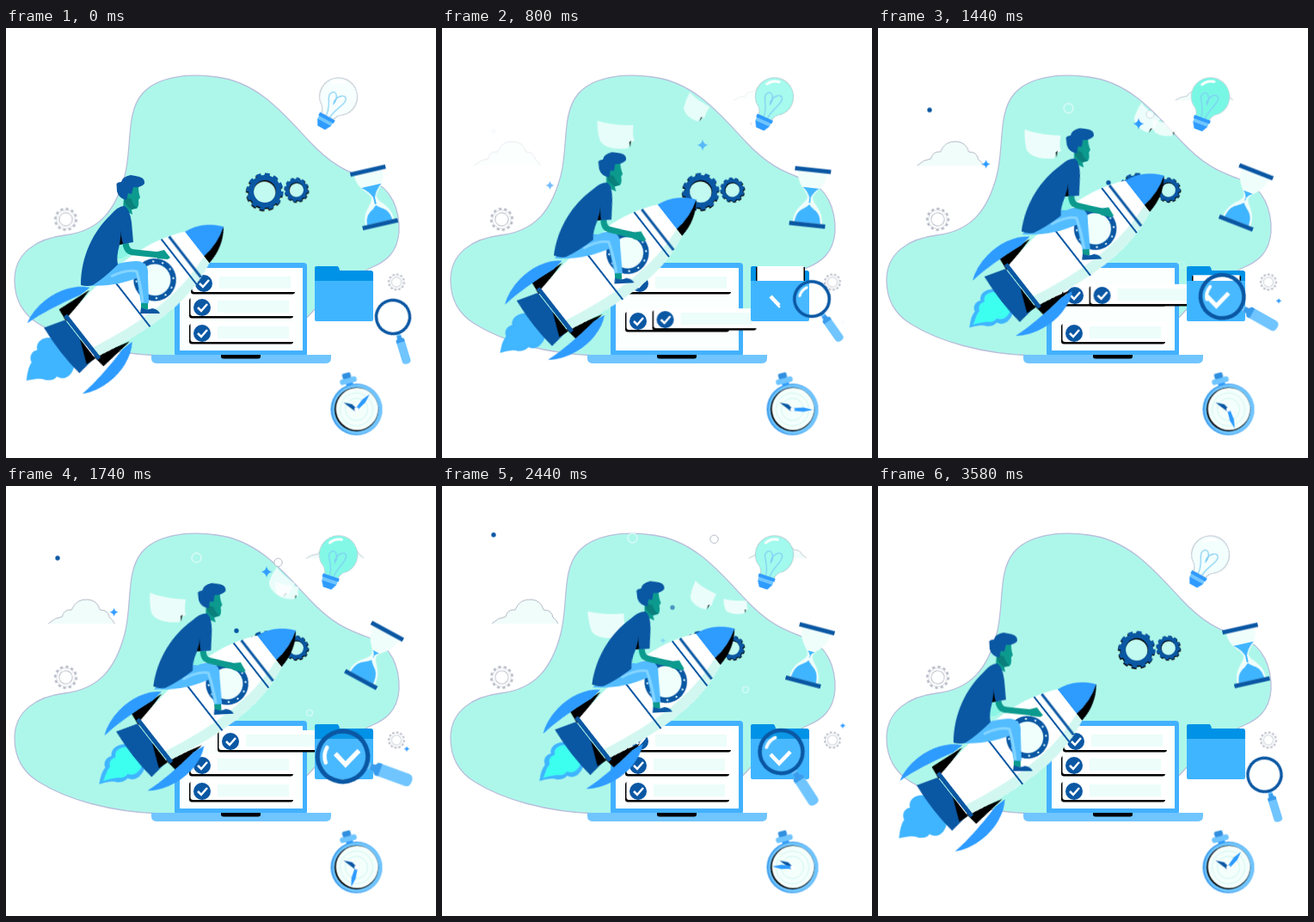
Write an HTML page that moves like this. It is 500x500 px and loops after 3.6 s.

```html
<!DOCTYPE html>
<html lang="en">
<head>
<meta charset="utf-8">
<title>Rocket launch</title>
<style>
html, body { margin: 0; height: 100%; overflow: hidden; background: #fff; }
svg { display: block; width: 100vw; height: 100vh; }

.navy { fill: #0a57a3; } .sky { fill: #40b5ff; } .blue { fill: #2e9bff; }
.pale { fill: #70c5ff; } .skin { fill: #0c9a8e; } .mint { fill: #ecfdfa; }
.white { fill: #fff; }
.line { fill: none; stroke: #0a57a3; }
.edge { stroke: #b4b9c6; stroke-width: 1; }

[class*="a-"] { animation: 3.6s linear infinite; }
.a-rocket { animation-name: rocket; }
.a-lean { animation-name: lean; }
.a-nod { animation-name: nod; }
.a-leg { animation-name: leg; }
.a-fin { animation-name: fin; }
.a-flame { animation-name: flame; }
.a-core { animation-name: core; }
.a-lens { animation-name: lens; }
.a-glass { animation-name: glass; }
.a-sand { animation-name: sand; }
.a-heap { animation-name: heap; }
.a-hand { animation-name: hand; }
.a-bulb { animation-name: bulb; }
.a-glow { animation-name: glow; }
.a-cloud { animation-name: cloud; }
.a-turn { animation-name: turn; }
.a-sheet { animation-name: sheet; }
.a-tick { animation-name: tick; stroke-dasharray: 1 2; }
.a-zoom { animation-name: zoom; }
.a-card1, .a-card2, .a-card3 { animation-timing-function: ease-in-out; }
.a-card1 { animation-name: card1; }
.a-card2 { animation-name: card2; }
.a-card3 { animation-name: card3; }
.a-paper1 { animation-name: paper1; }
.a-paper2 { animation-name: paper2; }
.a-paper3 { animation-name: paper3; }
.a-rise { --d: -139px; animation-name: rise, var(--f, mid); }
.late { --f: late; } .spark { --f: spark; } .long { --f: long; }

@keyframes rocket {
  0%, 100% { transform: none; }
  6.7% { transform: translate(1px, -.7px); }
  13.33% { transform: translate(7px, -5px); }
  15.5% { transform: translate(16px, -12px); }
  22% { transform: translate(42px, -31px); }
  31.67% { transform: translate(69px, -51px); }
  39% { transform: translate(79px, -59px); }
  48.33% { transform: translate(84px, -63px); }
  65% { transform: translate(88px, -66px); }
  76% { transform: translate(84.5px, -63px); }
  85% { transform: translate(75px, -55px); }
  90% { transform: translate(52px, -39px); }
  94.4% { transform: translate(22px, -16px); }
  98% { transform: translate(3px, -2px); }
}
@keyframes lean {
  0%, 99%, 100% { transform: none; }
  13.33%, 68% { transform: rotate(7.5deg); }
  85% { transform: rotate(5.5deg); }
}
@keyframes nod {
  0%, 99%, 100% { transform: none; }
  13.33%, 85% { transform: rotate(-11deg); }
}
@keyframes leg {
  0%, 99%, 100% { transform: none; }
  13.33%, 85% { transform: rotate(-3deg); }
}
@keyframes fin {
  0%, 99%, 100% { transform: none; }
  13.33%, 85% { transform: rotate(-8deg); }
}
@keyframes flame {
  0%, 100% { transform: scaleY(1.2); }
  13.33%, 38%, 64% { transform: scale(.92, 1); }
  26%, 50%, 76% { transform: none; }
  85% { transform: scaleY(1.1); }
}
@keyframes core { 0%, 22%, 80%, 100% { opacity: 0; } 31%, 70% { opacity: 1; } }
@keyframes lens {
  0%, 100% { transform: translate(450px, 336px) rotate(73deg); }
  13.33% { transform: translate(450px, 320px) rotate(70deg); }
  31.67% { transform: translate(409px, 310px) rotate(39deg) scale(1.08); }
  48.33% { transform: translate(391.5px, 314.5px) rotate(20deg) scale(1.5); }
  67.78% { transform: translate(394.5px, 309px) rotate(57deg) scale(1.28); }
  85% { transform: translate(434px, 332px) rotate(68deg) scale(1.05); }
}
@keyframes glass { 0%, 100% { transform: rotate(-13deg); } 50% { transform: rotate(30deg); } }
@keyframes sand {
  0%, 13.33%, 85%, 100% { transform: none; }
  31.67% { transform: scale(.6); }
  48.33%, 67.78% { transform: scale(.35); }
}
@keyframes heap {
  0%, 13.33%, 85%, 100% { transform: none; }
  48.33%, 67.78% { transform: scaleY(1.15); }
}
@keyframes hand { 0%, 9.7% { transform: rotate(-49deg); } 100% { transform: rotate(311deg); } }
@keyframes bulb { 0%, 100% { transform: rotate(29deg); } 60% { transform: rotate(16deg); } }
@keyframes glow {
  0%, 100% { opacity: .06; }
  13.33% { opacity: .25; }
  31.67% { opacity: 1; }
  48.33% { opacity: .85; }
  67.78% { opacity: .65; }
  85% { opacity: .85; }
}
@keyframes cloud {
  0%, 20% { opacity: 0; }
  28%, 70% { opacity: 1; }
  78%, 100% { opacity: 0; }
  0% { transform: none; }
  100% { transform: translateX(45px); }
}
@keyframes turn { to { transform: rotate(60deg); } }
@keyframes sheet {
  0%, 6%, 46%, 100% { transform: translateY(14px); }
  13.33% { transform: none; }
  22%, 32% { transform: translateY(-4px); }
}
@keyframes tick {
  0%, 8%, 90%, 100% { stroke-dashoffset: 1; }
  13.33%, 85% { stroke-dashoffset: .75; }
  31.67% { stroke-dashoffset: .35; }
  40%, 72% { stroke-dashoffset: 0; }
}
@keyframes zoom {
  0%, 32%, 68%, 100% { transform: none; }
  48.33% { transform: translateX(3px) scale(1.2); }
}
@keyframes card1 {
  0%, 34% { transform: translate(2px, -58px); }
  46%, 100% { transform: translate(0, -30px); }
}
@keyframes card2 {
  0%, 15% { transform: translate(0, -30px); }
  29%, 100% { transform: none; }
}
@keyframes card3 {
  0%, 3% { transform: none; }
  13%, 15% { transform: translate(31px, 0); }
  29%, 34% { transform: translate(32px, -30px); }
  46%, 50% { transform: translate(33px, -58px); }
  62%, 100% { transform: translate(2px, -58px); }
}
@keyframes paper1 {
  0%, 6% { transform: translate(216px, 114px) rotate(3deg); opacity: 0; }
  13.33% { transform: translate(208px, 120px); opacity: .6; }
  31.67% { transform: translate(194px, 129px) rotate(3deg); opacity: .8; }
  48.33% { transform: translate(187px, 142px) rotate(5deg); opacity: .75; }
  67.78% { transform: translate(191px, 161px) rotate(-2deg); opacity: .75; }
  85% { transform: translate(207px, 177px) rotate(-10deg); opacity: .35; }
  94%, 100% { transform: translate(214px, 184px) rotate(-12deg); opacity: 0; }
}
@keyframes paper2 {
  0%, 6% { transform: translate(279px, 83px) rotate(24deg); opacity: 0; }
  13.33% { transform: translate(286px, 88px) rotate(28deg); opacity: .6; }
  31.67% { transform: translate(303px, 98px) rotate(32deg); opacity: .8; }
  48.33% { transform: translate(319px, 113px) rotate(36deg); opacity: .75; }
  67.78% { transform: translate(302px, 128px) rotate(26deg); opacity: .75; }
  85% { transform: translate(285px, 137px) rotate(10deg); opacity: .65; }
  94%, 100% { transform: translate(278px, 142px); opacity: 0; }
}
@keyframes paper3 {
  0%, 20% { transform: translate(350px, 105px); opacity: 0; }
  31.67% { transform: translate(339px, 111px); opacity: .8; }
  48.33% { transform: translate(326px, 122px) rotate(8deg); opacity: .75; }
  67.78% { transform: translate(341px, 140px); opacity: .8; }
  85% { transform: translate(364px, 150px) rotate(-12deg); opacity: .65; }
  94%, 100% { transform: translate(371px, 155px) rotate(-14deg); opacity: 0; }
}
@keyframes rise { to { transform: translateY(var(--d)); } }
@keyframes mid { 0%, 22% { opacity: 0; } 31%, 70% { opacity: 1; } 80%, 100% { opacity: 0; } }
@keyframes late { 0%, 34% { opacity: 0; } 46%, 70% { opacity: 1; } 85% { opacity: .4; } 92%, 100% { opacity: 0; } }
@keyframes spark { 0%, 8% { opacity: 0; } 13.33% { opacity: .35; } 31%, 48% { opacity: 1; } 60%, 100% { opacity: 0; } }
@keyframes long { 0%, 8% { opacity: 0; } 13.33% { opacity: .25; } 40%, 52% { opacity: 1; } 68% { opacity: .6; } 85% { opacity: .3; } 92%, 100% { opacity: 0; } }
</style>
</head>
<body>
<svg viewBox="0 0 500 500">
  <defs>
    <path id="star" d="M0-6.5Q1-1 6.5 0Q1 1 0 6.5Q-1 1-6.5 0Q-1-1 0-6.5Z"/>
    <g id="gear" fill="none">
      <circle r="16" stroke-width="6"/>
      <circle r="19.5" stroke-width="4" pathLength="24" stroke-dasharray="1.1 .9"/>
    </g>
    <g id="cog">
      <circle r="12" fill="none" stroke="#b4b9c6" stroke-width="3" pathLength="24" stroke-dasharray="1 1"/>
      <circle r="11" class="white"/>
      <circle r="10.8" fill="none" stroke="#c9ccd5" stroke-width=".7"/>
      <circle r="7.7" class="white edge"/>
    </g>
    <g id="paper">
      <path class="white" d="M-21-16Q-5-11 21-12Q20 2 23 6Q16 8 16 15Q-8 19-17 8Q-21-4-21-16Z"/>
      <path d="M16.500 8l2.500-2-1 8z"/>
    </g>
    <g id="card">
      <rect x="213" y="344" width="121" height="23.500" rx="3"/>
      <rect x="214.500" y="342" width="122" height="23" rx="3" class="white"/>
      <rect x="246" y="347" width="83" height="14" class="mint"/>
      <circle cx="228" cy="355" r="10" class="navy"/>
      <path d="M223 355l4 4 7-8" fill="none" stroke="#fff" stroke-width="2.500"/>
    </g>
    <path id="cloud" d="M0 29Q7 22 16 21Q18 12 27 13Q32 0 46 1Q57 2 60 13Q70 13 71 22Q75 24 77 29"/>
    <path id="fin" class="blue" d="M2-5C-17-27-57-31-81-17C-60-16-40-12-12-5Z"/>
    <path id="shell" d="M-8 26Q-9 19-16 15A22 22 0 1 1 16 15Q9 19 8 26Z"/>
  </defs>

  <path fill="#adf7ea" stroke="#b9bfdc" stroke-width="1.300" d="M10 293C10 262 35 245 68 241C110 236 128 210 138 172C147 138 139 100 158 77C175 57 210 52 245 57C293 63 322 99 352 131C377 158 395 167 424 177C448 186 458 211 457 237C455 262 441 272 424 279C395 292 385 306 358 328C320 372 270 381 180 381C120 379 70 364 38 344C20 333 10 316 10 293Z"/>

  <!-- sky -->
  <g fill="#f1fdfb" class="edge">
    <g transform="translate(27.500 131)"><use href="#cloud" class="a-cloud"/></g>
    <g transform="translate(330 66) scale(.87 .62)"><use href="#cloud" class="a-cloud"/></g>
  </g>
  <use href="#paper" class="a-paper1"/>
  <g class="a-paper2"><use href="#paper" transform="scale(.68 .8)"/></g>
  <g class="a-paper3"><use href="#paper" transform="scale(.65 .55)"/></g>

  <circle class="a-rise navy" cx="60" cy="151" r="2.700"/>
  <circle class="a-rise navy long" cx="268" cy="235.500" r="2.700"/>
  <circle class="a-rise" style="--d:-118px" cx="221.500" cy="140.500" r="5.500" fill="none" stroke="#dcfbf6" stroke-width="1.300"/>
  <circle class="a-rise late white edge" cx="316.500" cy="156" r="4.700"/>
  <circle class="a-rise late" cx="353" cy="331" r="3.500" fill="none" stroke="#dcfbf6" stroke-width="1.200"/>
  <g transform="translate(303 167)"><use href="#star" class="a-rise spark blue"/></g>
  <g transform="translate(125.500 214) scale(.8)"><use href="#star" class="a-rise spark blue" style="--d:-174px"/></g>
  <g transform="translate(466 373) scale(.5)"><use href="#star" class="a-rise blue" style="--d:-278px"/></g>
  <g transform="translate(257 274) scale(.5)"><use href="#star" class="a-rise long pale" style="--d:-278px"/></g>

  <g transform="translate(386.500 80)"><g class="a-bulb">
    <use href="#shell" class="white edge"/>
    <use href="#shell" class="a-glow" fill="#6df7e3"/>
    <path d="M-2 26C-2 12-14 6-9-1C-4-6 1 4-1 10C-4 2 5-8 9-2C12 4 3 14 3 26" fill="none" stroke="#7dcdf5" stroke-width="1.200"/>
    <path d="M-14-10Q-10-17-2-18" fill="none" stroke="#fff" stroke-width="3" stroke-linecap="round"/>
    <path class="blue" d="M-10 26h20v4h-20zM-9 34h18l-4 7h-10z"/>
    <path class="pale" d="M-9 30h18v4h-18z"/>
  </g></g>

  <!-- gears -->
  <g transform="translate(301 190)">
    <circle r="14" fill="#c2f9f0"/>
    <g transform="translate(-.5 1.500)" stroke="#000"><use href="#gear" class="a-turn"/></g>
    <g stroke="#0a57a3"><use href="#gear" class="a-turn"/></g>
  </g>
  <g transform="translate(337.500 188) scale(.66)">
    <circle r="14" fill="#c2f9f0"/>
    <g transform="translate(1 1.500)" stroke="#000"><use href="#gear" class="a-turn"/></g>
    <g stroke="#0a57a3"><use href="#gear" class="a-turn"/></g>
  </g>
  <g transform="translate(69.500 222.500)"><use href="#cog" class="a-turn"/></g>
  <g transform="translate(454 295.500) scale(.74)"><use href="#cog" class="a-turn"/></g>

  <!-- laptop -->
  <rect x="196" y="273" width="154" height="109" rx="4" fill="#42b1ff"/>
  <rect x="202" y="279" width="143" height="96" fill="#fbfffe"/>
  <path class="pale" d="M169 380h209v4q0 6-7 6h-195q-7 0-7-6z"/>
  <path d="M250 380h46v2q0 2.500-3 2.500h-40q-3 0-3-2.500z"/>
  <use href="#card" class="a-card2"/>
  <use href="#card" class="a-card1"/>
  <use href="#card" class="a-card3"/>

  <!-- folder -->
  <path fill="#0092e6" d="M359 279q0-2 2-2h24q2 0 3 5h36q3 0 3 3v50h-68z"/>
  <g class="a-sheet">
    <rect x="365" y="282" width="57" height="40"/>
    <rect x="366.500" y="281" width="54" height="40" class="white"/>
  </g>
  <path class="sky" d="M359 294h68v45q0 2-2 2h-64q-2 0-2-2z"/>

  <g transform="translate(428 197)"><g class="a-glass">
    <path fill="#f0fefb" d="M-17-30H17C17-12 4-8 3 0C4 8 17 12 17 30H-17C-17 12-4 8-3 0C-4-8-17-12-17-30Z"/>
    <path class="sky a-sand" d="M-12-14H12Q4-8 1 0V8H-1V0Q-4-8-12-14Z"/>
    <g transform="translate(0 30)"><path class="sky a-heap" d="M-15 0C-14-15-6-14 0-21C6-14 14-15 15 0Z"/></g>
    <path class="navy" d="M-21-34.500h42v5h-42zM-21 29.500h42v5h-42z"/>
  </g></g>

  <!-- stopwatch -->
  <g transform="translate(407.500 443.500)">
    <g transform="rotate(-15)">
      <rect x="-4" y="-37" width="8" height="10" class="blue"/>
      <rect x="-10.500" y="-38" width="20" height="6.500" rx="3" class="pale"/>
      <rect x="-6" y="-44" width="10" height="6.500" rx="2" fill="#318fe0"/>
    </g>
    <circle r="30" fill="#3a9cec"/>
    <circle r="29" cx="1" class="pale"/>
    <circle r="25.500"/>
    <circle r="24.500" cx=".7" cy="-.5" fill="#f4fffc"/>
    <g fill="none" stroke="#c8f3ec" stroke-width=".8"><circle r="19"/><circle r="13"/></g>
    <path class="navy" d="M-15-8L-5-6L1 0L-2 2Z"/>
    <path class="a-hand blue" d="M0-1.500L13-2.500L23.500 0L13 2.500L0 1.500Z"/>
    <circle r="2.500" class="white"/>
  </g>

  <g class="a-lens">
    <path class="pale" d="M20-2.500H26L28-5H53Q57-5 57 0T53 5H28L26 2.500H20Z"/>
    <path d="M23-2.500H26L28-5H31V5H28L26 2.500H23Z" fill="#3a9cec"/>
    <circle r="19.500" fill="#dffcff" fill-opacity=".05" stroke="#0a57a3" stroke-width="3.500"/>
    <path d="M-10.700 9A14 14 0 0 1-13.800-2.400" fill="none" stroke="#fff" stroke-width="3" stroke-linecap="round"/>
  </g>
  <g transform="translate(393 316)"><g class="a-zoom"><path class="a-tick" pathLength="1" fill="none" stroke="#fff" stroke-width="4.500" d="M-11-4L-1 6.500L12-7"/></g></g>

  <!-- rocket and rider -->
  <g class="a-rocket">
    <g transform="translate(253 231) rotate(-38)">
      <g transform="translate(-236 0)"><g class="a-flame">
        <path class="sky" d="M0-17C-10-25-20-23-23-17C-30-20-36-16-37-11C-45-9-50-4-55 0C-45 4-39 7-37 11C-32 15-28 16-24 15C-20 24-8 23 0 17Z"/>
        <path class="a-core" fill="#3dfff0" d="M0-13C-10-20-17-19-20-13C-27-15-31-12-32-8C-40-7-43-2-49 0C-40 3-35 6-32 8C-28 12-25 12-21 11C-17 18-8 18 0 13Z"/>
      </g></g>
      <path d="M-168-38L-210-42L-212-26ZM-168 38L-210 42L-212 26Z"/>
      <g transform="translate(-168 -35)"><use href="#fin" class="a-fin"/></g>
      <g transform="translate(-168 35) scale(1 -1)"><use href="#fin" class="a-fin"/></g>
      <path class="white" d="M-39-23C-75-40-120-46-207-29V29C-120 46-75 40-39 23Z"/>
      <path fill="#d2f7f0" d="M-39 23C-75 40-120 46-207 29V17C-130 32-80 28-39 13Z"/>
      <path class="blue" d="M0 0Q-15-20-39-23V23Q-15 18 0 0Z"/>
      <path d="M0 0Q-18 12-39 13V23Q-15 19 0 0Z"/>
      <path class="line" stroke-width="3" d="M-57-30V30"/>
      <path class="line" stroke-width="2" d="M-66-33V33M-139-39V39"/>
      <circle cx="-101" cy="-.5" r="21.500" fill="#f0fffc" stroke="#0a57a3" stroke-width="6.500"/>
      <circle cx="-101" cy="-.5" r="21.500" fill="none" stroke="#d8f4ff" stroke-width="2" pathLength="48" stroke-dasharray=".8 3.200"/>
      <path class="navy" d="M-212-28L-237-36Q-241 0-237 31L-212 28Z"/>
      <path d="M-212 0L-224 28L-212 29Z"/>
      <rect x="-211" y="-32" width="5" height="64" rx="1" class="navy"/>
    </g>

    <g transform="translate(100 297)"><g class="a-leg"><g transform="translate(-100 -297)">
      <path class="skin" d="M157 316h8v11h-8z"/>
      <path class="navy" d="M157 325Q163 329 170 326Q177 327 179 332H156Z"/>
      <path fill="#52bcff" d="M88 299C105 280 128 272 152 271C163 272 166 278 165 288L166 320H157L152 291C138 296 118 302 88 299Z"/>
      <path d="M122 289Q140 280 152 283Q157 300 159 319" fill="none" stroke="#83d4ff" stroke-width="3"/>
    </g></g></g>
    <g transform="translate(110 300)"><g class="a-lean"><g transform="translate(-110 -300)">
      <path fill="#8af5e4" d="M128 249h12l3 14-8 5h-7z"/>
      <path d="M139 250Q140 261 150 261L179 264" fill="none" stroke="#0c9a8e" stroke-width="7"/>
      <path class="skin" d="M176 260L184 258L187 262L191 267L188 269L176 268Z"/>
      <g transform="translate(142 206)"><g class="a-nod"><g transform="translate(-142 -206)">
        <path class="skin" d="M137 196L148 184L154 184Q154 192 156 197L154 200Q155 207 152 210L146 211L147 217L136 211Z"/>
        <path fill="#0a7f7c" d="M138 196L146 199Q147 205 152 209L146 211Q141 208 138 203Z"/>
        <path class="navy" d="M128.500 181Q130 179 134 179Q135 173 145 171Q151 172 155 173Q162 175 161 181Q157 186 148 185L146 193L142 192L140 200Q131 198 129 190Z"/>
      </g></g></g>
      <path class="navy" d="M87 299C87 265 102 236 121 218Q131 206 138 207Q144 211 146 226L148 249L132 252Q128 266 130 275Q115 290 101 299Q95 301 87 299Z"/>
      <path d="M134 230Q133 242 136 251L132 252Q134 241 134 230Z"/>
    </g></g></g>
  </g>
</svg>
</body>
</html>
```
